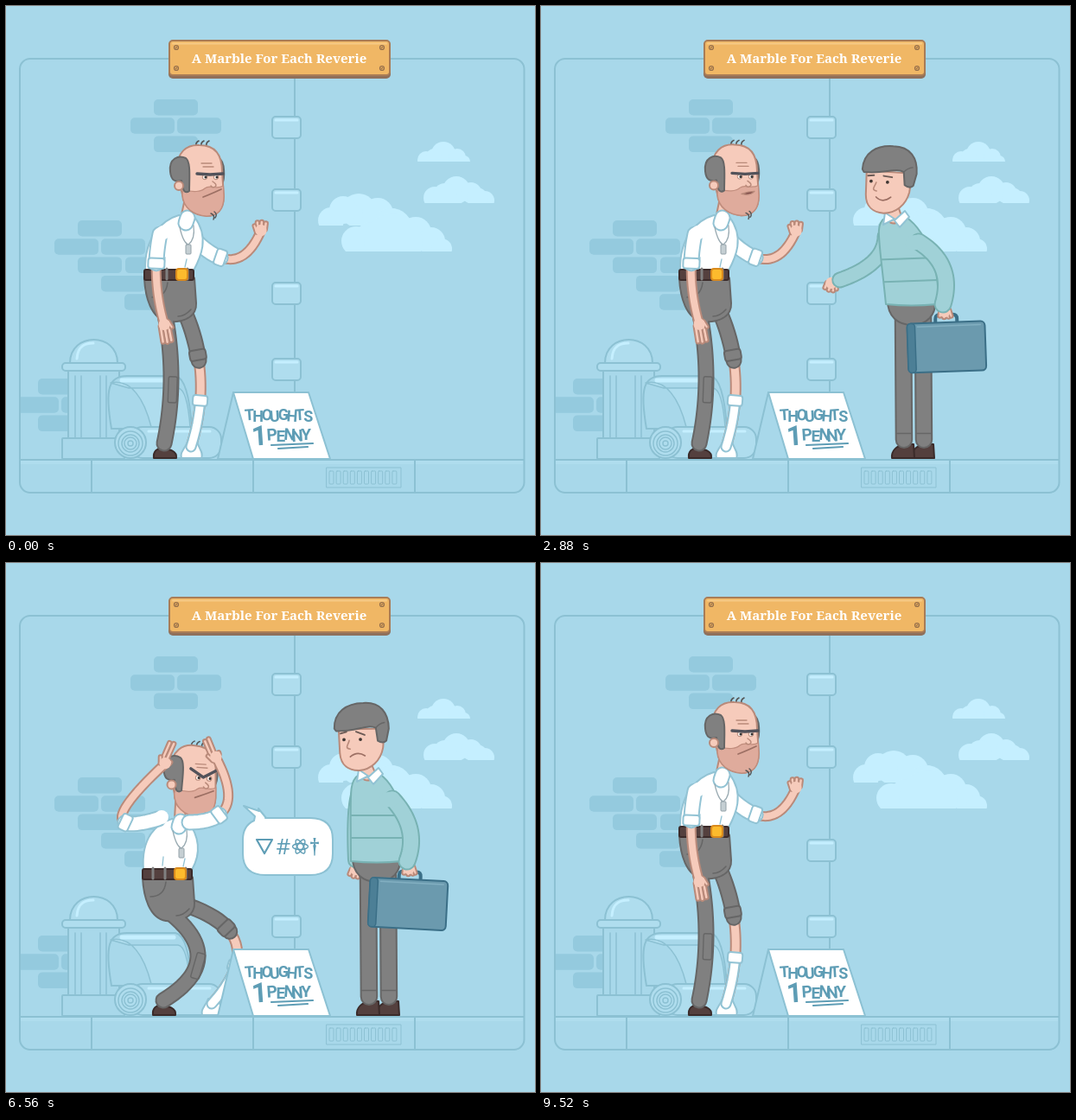
Animation of 612x612 px, one loop 9640 ms. Source, as an HTML page with a canvas:

```html
<!DOCTYPE html>
<html lang="en">
<head>
<meta charset="utf-8">
<title>Street scene</title>
<style>
html, body { margin: 0; width: 100%; height: 100%; overflow: hidden; background: #a8d8ea; }
canvas { display: block; width: 100vw; height: 100vh; }
</style>
</head>
<body>
<canvas id="stage" width="612" height="612"></canvas>
<script>
const canvas = document.getElementById('stage');
const c = canvas.getContext('2d');
const LOOP = 9640, STEP = 40, RAD = Math.PI / 180;
const SKY = '#a8d8ea', EDGE = '#8cc1d3', PALE = '#afddee', BRICK = '#94cade', CLOUD = '#c5efff', INK = '#5e9db5';
const SKIN = ['#f6cbbb', '#b98a7a'], SHIRT = ['#ffffff', '#92c3d4'], PANTS = ['#808080', '#666666'];
const SHOE = ['#54403e', '#3b2b2a'], KNIT = ['#a0d1d7', '#78b2b3'], CASE = ['#6b9aae', '#3b6f87'];

// ---------- drawing helpers ----------
function shape(d, fill, line, w = 2) {
  const p = new Path2D(d);
  if (fill) { c.fillStyle = fill; c.fill(p); }
  if (line) { c.strokeStyle = line; c.lineWidth = w; c.stroke(p); }
}
function box(x, y, w, h, r, fill, line, lw = 2) {
  c.beginPath();
  c.roundRect(x, y, w, h, r);
  if (fill) { c.fillStyle = fill; c.fill(); }
  if (line) { c.strokeStyle = line; c.lineWidth = lw; c.stroke(); }
}
function dot(x, y, r, fill, line, lw = 2) {
  c.beginPath();
  c.arc(x, y, r, 0, 7);
  if (fill) { c.fillStyle = fill; c.fill(); }
  if (line) { c.strokeStyle = line; c.lineWidth = lw; c.stroke(); }
}
function at(x, y, deg, draw) {
  c.save();
  c.translate(x, y);
  c.rotate(deg * RAD);
  draw();
  c.restore();
}
function stroke(pts, w, color) {
  c.beginPath();
  pts.forEach(p => c.lineTo(p[0], p[1]));
  c.lineWidth = w;
  c.strokeStyle = color;
  c.stroke();
}
function limb(pts, w, [fill, line]) {
  stroke(pts, w + 1, line);
  stroke(pts, w - 3, fill);
}
// Samples a quadratic curve that passes through the middle point.
function bend(ax, ay, mx, my, bx, by, n = 24) {
  const qx = 2 * mx - (ax + bx) / 2, qy = 2 * my - (ay + by) / 2;
  return Array.from({ length: n + 1 }, (_, i) => {
    const t = i / n, u = 1 - t;
    return [u * u * ax + 2 * u * t * qx + t * t * bx, u * u * ay + 2 * u * t * qy + t * t * by];
  });
}
const clamp = v => Math.max(0, Math.min(1, v));
const part = (pts, from, to) => pts.slice(Math.round(from * 24), Math.round(to * 24) + 1);
function cuff(pts, i, w, colors) {
  const a = pts[i - 2], b = pts[i];
  at((a[0] + b[0]) / 2, (a[1] + b[1]) / 2, Math.atan2(b[1] - a[1], b[0] - a[0]) / RAD,
    () => box(-6, -w / 2, 12, w, 3, ...colors));
}
// fold counts how many fingers are curled in.
function hand(x, y, dir, len, fold = 0) {
  at(x, y, dir, () => {
    [fold - 2, fold - 1, fold].forEach((f, i) => {
      const reach = 5 + len * (1 - clamp(f)) - Math.abs(i - 1);
      limb([[2, (i - 1) * 4.6], [reach, (i - 1) * 4.9]], 5.5, SKIN);
    });
    limb([[-2, -5], [5, -8]], 5, SKIN);
    box(-6, -6.5, 13, 13, 6, SKIN[0]);
  });
}

// ---------- scenery ----------
function puff(base, circles) {
  c.save();
  c.beginPath();
  c.rect(340, 0, 272, base);
  c.clip();
  circles.forEach(([x, y, r]) => dot(x, y, r, CLOUD));
  c.restore();
}
function bricks(x, y, rows) {
  rows.forEach((row, i) => row.forEach(dx => box(x + dx, y + i * 21.3, 51, 18.5, 5, BRICK)));
}
function scenery() {
  c.fillStyle = SKY;
  c.fillRect(0, 0, 612, 612);
  bricks(144, 108, [[27], [0, 54], [27]]);
  bricks(56, 248, [[27], [0, 54], [27, 82], [54, 109], [81]]);
  c.save();
  c.beginPath();
  c.rect(16, 400, 120, 130);
  c.clip();
  bricks(10, 431, [[27], [0, 54], [27]]);
  c.restore();
  puff(180, [[506, 171, 14], [486, 178, 10], [522, 175, 10], [530, 180, 7], [495, 174, 9]]);
  puff(228, [[521, 213, 16], [496, 222, 13], [538, 216, 12], [554, 225, 11], [508, 219, 14], [545, 222, 12]]);
  puff(254, [[408, 237, 20], [376, 248, 15], [390, 236, 16], [430, 240, 18], [446, 250, 16]]);
  puff(284, [[446, 258, 24], [474, 262, 18], [492, 272, 16], [504, 281, 12], [422, 268, 18], [405, 272, 17], [448, 274, 34]]);
  stroke([[334, 82], [334, 448]], 2, EDGE);
  [128, 212, 320, 408].forEach(y => {
    box(308, y, 33, 25, 4, PALE, EDGE);
    stroke([[312, y + 4], [337, y + 4]], 3, CLOUD);
  });
  // column
  shape('M74 413C74 377 129 377 129 413Z', PALE, EDGE);
  shape('M82 408C83 392 93 390 101 390', null, CLOUD, 3);
  box(72, 422, 59, 79, 0, SKY, EDGE);
  [80, 87, 109, 116].forEach(x => stroke([[x, 428], [x, 500]], 1.5, EDGE));
  box(65, 413, 73, 9, 4, PALE, EDGE);
  box(65, 500, 72, 24, 1, SKY, EDGE);
  // bedroll
  shape('M122 489C114 442 119 428 140 428H196C208 430 213 458 215 489Z', SKY, EDGE);
  shape('M121 436C145 431 160 455 168 487H213C211 460 207 443 199 442H142Z', PALE, EDGE, 1.5);
  stroke([[134, 433], [194, 433]], 5, CLOUD);
  box(144, 487, 105, 36, 14, PALE, EDGE);
  stroke([[165, 492], [236, 492]], 3, CLOUD);
  dot(144, 505, 18, PALE, EDGE);
  [14, 10, 7, 3].forEach(r => dot(144, 506, r, null, EDGE, 1.5));
  // floor and frame
  c.fillStyle = PALE;
  c.fillRect(17, 525, 581, 5);
  stroke([[16, 525], [599, 525]], 2, EDGE);
  [99, 286, 473].forEach(x => stroke([[x, 525], [x, 563]], 2, EDGE));
  box(371, 534, 86, 23, 0, null, EDGE, 1);
  for (let i = 0; i < 10; i++) box(374 + i * 8.1, 538, 5, 15, 1, null, EDGE, 1);
  box(16, 61, 583.5, 502, 12, null, EDGE);
}
function plaque() {
  box(188, 41, 257, 43, 5, '#8f705b');
  box(189, 40, 255, 40, 4, '#f0b765', '#a97c56');
  stroke([[193, 43.5], [440, 43.5]], 2, '#f8cb86');
  [[197, 48], [435, 48], [197, 72], [435, 72]].forEach(([x, y]) => {
    dot(x, y, 2.5, '#dca45a', '#96704c', 1.2);
    stroke([[x - 1, y + 1], [x + 1, y - 1]], 1, '#96704c');
  });
  write('A Marble For Each Reverie', 316, 65.5, 'bold 15px "Noto Serif", serif', '#fff');
}
function write(s, x, y, font, color) {
  c.font = font;
  c.fillStyle = color;
  c.textAlign = 'center';
  c.fillText(s, x, y);
}
function lettering(s, x, y, gap, size) {
  [...s].forEach((ch, i) => at(x + i * gap, y + (i % 2 ? .8 : -.8), i % 3 * 4 - 4,
    () => write(ch, 0, 0, `bold ${size}px Roboto, sans-serif`, INK)));
}
function board() {
  shape('M263 447L245 524H286L282 490Z', SKY, EDGE);
  shape('M263 447H350L375 524H286Z', '#fff', EDGE);
  lettering('THOUGHTS', 282, 480, 9.7, 18);
  lettering('1', 294, 509, 0, 32);
  lettering('PENNY', 308, 503, 9.8, 19);
  shape('M307 508L355 506M315 512L349 510', null, INK, 2.2);
}

// ---------- poses ----------
// look: anger, far arm in front, curled fingers
const stand = {
  head: [224, 200, 0], neck: [209, 242], belt: [189, 311, 0],
  near: [178, 264, 174, 315, 183, 368, 80, 16], far: [216, 268, 262, 293, 295, 260, -85, 5],
  nLeg: [183, 352, 191, 430, 183, 506, 0], fLeg: [206, 352, 225, 430, 214, 510, .66], look: [0, 0, 0]
};
const rant = {
  head: [177, 210, -44], neck: [192, 254], belt: [182, 326, -3],
  near: [178, 274, 222, 238, 245, 198, -65, 20], far: [205, 270, 253, 245, 254, 198, -115, 6],
  nLeg: [178, 366, 210, 440, 182, 506, 0], fLeg: [201, 362, 241, 426, 214, 510, .64], look: [0, 0, 2]
};
const fling = {
  ...rant, head: [176, 222, -20], neck: [184, 264], belt: [183, 334, 0],
  near: [165, 280, 120, 290, 82, 258, -150, 12], far: [205, 280, 245, 262, 262, 222, -60, 14],
  nLeg: [180, 374, 214, 442, 182, 506, 0], look: [1, 0, 0]
};
const raise = {
  ...rant, head: [200, 225, -8], neck: [194, 270], belt: [184, 338, 0],
  near: [170, 280, 142, 232, 176, 176, -75, 18], far: [212, 280, 252, 230, 240, 174, -100, 18],
  nLeg: [180, 378, 216, 444, 182, 506, 0], look: [1, 1, 1]
};
const horns = {
  head: [216, 250, 4], neck: [201, 296], belt: [187, 360, 0],
  near: [176, 296, 134, 293, 184, 232, -66, 20], far: [212, 300, 255, 281, 243, 225, -112, 18],
  nLeg: [186, 402, 222, 456, 182, 506, 0], fLeg: [203, 394, 266, 440, 238, 510, .72], look: [1, 1, 1]
};
const kneel = {
  head: [222, 291, -33], neck: [218, 337], belt: [193, 398, 14],
  near: [206, 354, 258, 387, 312, 376, -12, 4], far: [232, 341, 281, 326, 302, 268, -75, 4],
  nLeg: [184, 436, 206, 501, 146, 514, 110], fLeg: [204, 430, 227, 480, 224, 514, 1], look: [-.5, 0, 0]
};
const slump = {
  head: [256, 350, 12], neck: [234, 386], belt: [187, 426, 36],
  near: [220, 404, 238, 452, 270, 498, 30, 12], far: [238, 394, 266, 446, 292, 488, 40, 10],
  nLeg: [178, 462, 192, 510, 112, 513, 110], fLeg: [200, 458, 220, 494, 210, 516, 1], look: [0, 0, 0]
};
const hop = { ...stand, head: [220, 192, -4], neck: [206, 236], belt: [186, 306, -2], near: [174, 260, 164, 310, 166, 362, 95, 16] };
const beggar = [
  [0, stand], [3200, stand], [3620, rant], [4640, rant], [4980, fling], [5180, fling], [5560, raise],
  [5960, horns], [6960, horns], [7320, kneel], [7960, kneel], [8360, slump], [8820, slump], [9240, hop], [9480, stand], [LOOP, stand]
];

const wait = {
  hip: [429, 345], neck: [418, 243], head: [418, 200, 0],
  near: [471, 308, 468, 345, 0], far: [404, 300, 405, 354], foot: [430], mouth: [.4, 0]
};
const give = {
  ...wait, neck: [408, 243], head: [403, 202, 4],
  near: [465, 304, 465, 345, -2], far: [382, 298, 336, 320], mouth: [1, 0]
};
const recoil = {
  ...wait, hip: [456, 343], neck: [456, 238], head: [456, 190, 10],
  near: [505, 290, 522, 330, -28], far: [420, 292, 404, 312], mouth: [-.4, 1]
};
const doubt = {
  ...wait, hip: [455, 342], neck: [445, 240], head: [440, 196, 0],
  near: [494, 303, 495, 340, 0], far: [444, 295, 446, 330], mouth: [-.2, .25]
};
const frown = { ...wait, head: [412, 202, -1], near: [467, 308, 464, 345, 3], mouth: [-1, 0] };
const leave = {
  ...wait, neck: [438, 243], head: [444, 200, 0],
  near: [469, 310, 461, 350, 14], far: [416, 308, 393, 350], foot: [451], mouth: [0, .9]
};
const passer = [
  [0, wait], [1960, wait], [2560, give], [3280, give], [3600, recoil], [4040, doubt], [5080, doubt],
  [5720, frown], [7060, frown], [7440, leave], [LOOP, leave]
];
function poseAt(keys, t) {
  const i = Math.max(1, keys.findIndex(k => k[0] > t));
  const [t0, a] = keys[i - 1], [t1, b] = keys[i];
  const k = (t - t0) / (t1 - t0), e = k * k * (3 - 2 * k), out = {};
  for (const name in a) out[name] = a[name].map((v, j) => v + (b[name][j] - v) * e);
  return out;
}

// ---------- beggar ----------
function beggarHead(angry, talk) {
  [-6, 0, 6].forEach(x => shape(`M${x + 2} -38Q${x + 1} -42 ${x + 5} -44`, null, '#555', 1.6));
  shape('M22 -24C30 -20 29 0 26 6L22 4Z', ...PANTS);
  shape('M-27 -8C-27 -32 -14 -40 0 -39C18 -39 26 -28 26 -8L28 20C28 36 20 43 8 43C-6 42 -19 34 -20 18Z', ...SKIN);
  shape('M-19 12C-8 16 2 15 6 11C12 6 19 13 27.5 8L28 20C28 36 20 43 8 43C-6 42 -19 34 -20 18Z', '#dfab9c', '#c18d7d', 1.2);
  shape('M-34 -8C-36 -24 -24 -28 -16 -24C-10 -20 -12 0 -12 14C-17 18 -20 13 -21 2C-28 4 -33 2 -34 -8Z', ...PANTS);
  dot(-24, 8, 5, ...SKIN);
  shape('M2 -18H14M4 -14H16', null, SKIN[1], 1.3);
  [[6, -2], [19, -2]].forEach(([x, y]) => {
    dot(x, y, 2.8, '#fdf2ec', SKIN[1], 1);
    dot(x + 1, y, 1.5, '#333');
  });
  const a = Math.max(0, angry) * 6;
  shape(`M-3 ${-6 - a}L12 ${-5 + a / 3}L27 ${-6 - a}`, null, '#52525a', 3.4);
  shape('M15 3Q21 7 18 9Q15 11 13 8', SKIN[0], SKIN[1], 1.5);
  if (talk > .1) shape(`M8 18Q16 ${16 - talk * 3} 23 15Q18 ${19 + talk * 4} 8 18Z`, '#7d4a48', SKIN[1], 1.3);
  else shape('M4 21Q12 18 25 12', null, '#9c6f63', 1.7);
  shape('M13 40Q18 42 16 47M17 38Q21 41 18 45', null, '#555', 1.4);
}
function arm([sx, sy, mx, my, hx, hy, dir, len], fold) {
  const pts = bend(sx, sy, mx, my, hx, hy);
  limb(part(pts, .3, 1), 11, SKIN);
  hand(hx, hy, dir, len, fold);
  limb(part(pts, 0, .34), 18, SHIRT);
  cuff(pts, 9, 19, SHIRT);
}
function drawBeggar(t) {
  const p = poseAt(beggar, t);
  const sway = Math.sin(t / 260) * (t < 3200 ? .6 : t < 8900 ? 1 : 0);
  p.head[1] += sway;
  p.near[5] += sway * .5;
  p.far[5] -= sway;
  const [nx, ny] = p.neck, [bx, by, rot] = p.belt, [hx, hy, tilt] = p.head, [anger, front, fold] = p.look;
  const cos = Math.cos(rot * RAD), sin = Math.sin(rot * RAD);
  const world = (x, y) => [bx + x * cos - y * sin, by + x * sin + y * cos];
  const onTop = front > .5;
  if (!onTop) arm(p.far, fold);

  // bare leg with sock
  const fl = bend(...p.fLeg.slice(0, 6)), sock = p.fLeg[6];
  limb(part(fl, .35, 1), 12, SKIN);
  if (sock < .95) {
    const [fx, fy] = p.fLeg.slice(4);
    at(fx, fy, 0, () => shape('M-4 -6C-8 4 -13 6 -11 13H12C15 7 9 2 7 -6Z', ...SHIRT));
    limb(part(fl, sock, 1), 12, SHIRT);
    cuff(fl, Math.round(sock * 24) + 1, 17, SHIRT);
  }
  // trousers share one outline
  const [nfx, nfy, turn] = p.nLeg.slice(4);
  at(nfx, nfy, turn, () => shape('M-12 17C-13 9 -8 5 -2 6C6 7 15 8 14 17Z', ...SHOE));
  const nl = bend(...p.nLeg.slice(0, 6)), thigh = part(fl, 0, .36);
  const seat = 'M-28 4C-27 26 -20 50 -2 53C15 55 31 48 30 33L28 4Z';
  stroke(thigh, 19, PANTS[1]);
  stroke(thigh, 15, PANTS[0]);
  cuff(fl, 9, 19, PANTS);
  stroke(nl, 19, PANTS[1]);
  at(bx, by, rot, () => shape(seat, null, PANTS[1], 4));
  stroke(nl, 15, PANTS[0]);
  at(bx, by, rot, () => {
    shape(seat, PANTS[0]);
    shape('M-20 26Q-4 26 -2 9M25 40Q18 48 10 48', null, PANTS[1], 1.6);
  });
  const [kx, ky] = nl[14];
  at(kx, ky, Math.atan2(nl[15][1] - nl[13][1], nl[15][0] - nl[13][0]) / RAD - 90,
    () => box(-3, -14, 10, 30, 2, null, PANTS[1], 1.4));

  // shirt
  const [lx, ly] = world(-28, -5), [rx, ry] = world(28, -5), ux = nx - bx, uy = ny - by;
  shape(`M${nx - 9} ${ny}C${nx - 26} ${ny + 5} ${lx + ux * .35 - 8} ${ly + uy * .6} ${lx} ${ly}
    L${rx} ${ry}C${rx + 8} ${ry + uy * .22} ${nx + 27} ${ny + 26} ${nx + 9} ${ny + 2}Z`, ...SHIRT);
  at(bx, by, rot, () => {
    box(-29, -6, 57, 12, 2, ...SHOE);
    [-17, -3, 21].forEach(x => stroke([[x, -7], [x, 5]], 3, PANTS[0]));
    box(8, -7, 13, 13, 3, '#fdbb2d', '#d98a1d');
    shape('M-6 -10L-5 -20M18 -9L20 -18', null, SHIRT[1], 1.3);
  });
  const jx = hx - 12 * Math.cos(tilt * RAD) - 28 * Math.sin(tilt * RAD);
  const jy = hy - 12 * Math.sin(tilt * RAD) + 28 * Math.cos(tilt * RAD);
  limb([[nx, ny], [jx, jy]], 13, SKIN);
  limb([[nx - 1, ny + 9], [nx + 1, ny + 3]], 18, SHIRT);
  shape(`M${nx - 8} ${ny + 14}Q${nx - 4} ${ny + 32} ${nx + 2} ${ny + 34}Q${nx + 10} ${ny + 28} ${nx + 8} ${ny + 12}`, null, '#9aabb2', 1.3);
  box(nx - 1, ny + 34, 6, 11, 1, '#c5cfd3', '#93a1a8', 1);
  const speaking = t > 2240 && t < 3200 || t > 3560 && t < 5000 || t > 5900 && t < 6480 || t > 7200 && t < 8000;
  at(hx, hy, tilt, () => beggarHead(anger, speaking ? .5 + .5 * Math.sin(t / 70) : 0));
  if (onTop) arm(p.far, fold);
  arm(p.near, fold);
  dot(p.near[0] + 4, p.near[1] - 2, 8, SHIRT[0]);
}

// ---------- passer-by ----------
// Walks in from the right, later backs out the same way.
function shiftAt(t) {
  if (t < 1040) return 242 * (1 - t / 1040) ** 1.15;
  return t > 7100 ? 51 * ((t - 7100) / 380) ** 1.2 : 0;
}
function passerHead([curve, open]) {
  shape('M-27 -10L-26 18C-25 32 -16 38 -4 38C10 37 21 27 24 12L26 -10Z', ...SKIN);
  shape('M-32 -11C-32 -30 -18 -40 2 -40C22 -41 31 -28 31 -10L28 4Q24 8 18 4L16 -11C6 -16 -6 -7 -30 -8Z', ...PANTS);
  shape('M16 -11Q20 -16 26 -17', null, PANTS[1], 1.4);
  const b = curve < 0 ? 2 : 0;
  shape(`M-25 ${-4 - b / 2}L-18 ${-5 - b}M-7 ${-5 - b}L3 ${-4 + b / 2}`, null, '#6b5a55', 1.8);
  dot(-21, 2, 1.9, '#3f3734');
  dot(-2, 2, 1.9, '#3f3734');
  shape('M-15 3C-16 8 -21 12 -14 13', null, SKIN[1], 1.6);
  if (open > .2) {
    c.beginPath();
    c.ellipse(-10, 22, 5 - open * 1.5, 1 + open * 3.5, 0, 0, 7);
    c.fillStyle = '#7d4a48';
    c.fill();
    c.strokeStyle = SKIN[1];
    c.stroke();
  } else shape(`M-14 ${21 - curve}Q-6 ${21 + curve * 6} 3 ${20 - curve}`, null, '#9c6f63', 1.7);
}
function drawPasser(t) {
  const shift = shiftAt(t);
  if (shift > 236) return;
  const p = poseAt(passer, t), [px, py] = p.hip, [nx, ny] = p.neck;
  const walk = Math.min(1, shift / 40), theta = shift / 17.5 - 1.95;
  c.save();
  c.beginPath();
  c.rect(16, 62, 582, 500);
  c.clip();
  c.translate(shift, 0);

  const [fmx, fmy, fhx, fhy] = p.far, fa = bend(nx - 10, ny + 24, fmx, fmy, fhx, fhy);
  hand(fhx, fhy, 110, 4);
  limb(part(fa, 0, .9), 18, KNIT);

  const seat = `M${px - 28} ${py - 4}C${px - 28} ${py + 14} ${px - 16} ${py + 24} ${px} ${py + 24}C${px + 18} ${py + 24} ${px + 28} ${py + 12} ${px + 27} ${py - 4}Z`;
  [1, 0].forEach(side => {
    const a = theta + side * Math.PI, up = walk * 26 * Math.max(0, Math.cos(a)), gap = side ? 13 : -10;
    const ax = p.foot[0] + gap * (1 - walk * .6) + walk * 18 * Math.sin(a), ay = 508 - up;
    const sx = px + gap, sy = py + 14;
    const pts = bend(sx, sy, (sx + ax) / 2 - up * 2.6, (sy + ay) / 2 + up * 1.2, ax, ay);
    at(ax, ay, -up * 2.8, () => shape('M-14 15C-15 6 -8 1 0 -1L11 -1L12 15Z', ...SHOE));
    limb(part(pts, 0, .97), 19.5, PANTS);
    const [qx, qy] = pts[22];
    at(qx, qy, -up * 2.4, () => stroke([[-8, -1], [8, -1]], 1.5, PANTS[1]));
  });
  shape(seat, ...PANTS);

  // sweater
  const d = nx - px + 11, torso = `M${nx - 10} ${ny + 2}C${nx - 22} ${ny + 10} ${px - 30 + d * .8} ${py - 80} ${px - 30} ${py}
    Q${px} ${py + 3} ${px + 29} ${py}C${px + 34} ${py - 30} ${nx + 42} ${ny + 20} ${nx + 14} ${ny + 1}Z`;
  shape(torso, KNIT[0]);
  c.save();
  c.clip(new Path2D(torso));
  const slope = d * .25;
  [53, 27].forEach(h => stroke([[px - 70, py - h - slope], [px + 70, py - h + slope]], 2, KNIT[1]));
  c.restore();
  shape(torso, null, KNIT[1]);

  const [hx, hy, tilt] = p.head;
  limb([[nx, ny], [hx + 2, hy + 32]], 18, SKIN);
  shape(`M${nx - 10} ${ny - 4}L${nx - 12} ${ny + 10}L${nx} ${ny + 4}L${nx + 7} ${ny + 13}L${nx + 18} ${ny + 1}L${nx + 13} ${ny - 6}L${nx + 2} ${ny + 4}Z`, ...SHIRT);
  at(hx, hy, tilt, () => passerHead(p.mouth));

  // arm and case
  const [mx, my, ex, ey, swing] = p.near;
  at(ex + 3, ey + 12, swing + Math.sin(theta) * walk * 3, () => {
    shape('M-12 10V5Q-12 0 -7 0H8Q13 0 13 5V10', null, CASE[1], 4);
    box(-45, 9, 90, 57, 5, ...CASE);
    box(-45, 9, 9, 57, 4, '#4c7f96', CASE[1], 1.5);
    stroke([[-33, 13], [40, 13]], 1.5, '#82afc1');
  });
  hand(ex + 2, ey + 8, 95, 2);
  const sx = nx + 29, sy = ny + 30;
  limb(bend(sx, sy, mx, my, ex, ey), 20, KNIT);
  stroke([[sx - 7, sy + 1], [sx, sy]], 17, KNIT[0]);
  c.restore();
}

// ---------- speech ----------
function bubble(t, from, to, tx, ty, draw) {
  const s = Math.min(1, (t - from) / 160, (to - t) / 120);
  if (s <= 0) return;
  c.save();
  c.translate(tx, ty);
  c.scale(s, s);
  c.translate(-tx, -ty);
  draw();
  c.restore();
}
function star(x, y, n, r1, r2) {
  let d = 'M';
  for (let i = 0; i < n * 2; i++) {
    const r = i % 2 ? r2 : r1, a = i * Math.PI / n;
    d += `${x + r * Math.sin(a)} ${y - r * Math.cos(a)} `;
  }
  shape(d + 'Z', null, INK, 1.6);
}
function firstWords() {
  shape('M232 99H282Q309 99 309 124V140Q309 165 282 165H232L222 175L221 171L207 178L217 167L216 163Q205 156 205 140V124Q205 99 232 99Z', '#fff', EDGE);
  dot(226, 132, 8.5, null, INK, 1.8);
  shape('M221 128L225 131M231 128L227 131M222 137Q226 132 230 137', null, INK, 1.8);
  shape('M243 124C254 128 254 139 239 138C250 146 259 135 253 127Q249 122 243 124Z', null, INK, 1.6);
  shape('M267 121C270 127 276 131 275 137C273 144 261 144 259 137C257 133 261 130 261 127L264 130Z', INK);
  shape('M268 131Q273 138 267 140Q262 138 268 131Z', '#fff');
  star(288, 132, 9, 10, 5);
}
function secondWords() {
  shape('M300 295H352Q378 295 378 320V336Q378 361 352 361H300Q274 361 274 336V320Q274 304 287 298L288 293L275 281L293 287L292 284L301 295Z', '#fff', EDGE);
  shape('M290 320H308L299 336Z', null, INK, 2.2);
  write('#', 321, 337, '26px "Open Sans", sans-serif', INK);
  [0, 60, 120].forEach(r => at(340.5, 328, r, () => {
    c.beginPath();
    c.ellipse(0, 0, 9, 3.5, 0, 0, 7);
    c.strokeStyle = INK;
    c.lineWidth = 1.4;
    c.stroke();
  }));
  write('†', 357, 336, 'bold 24px "Noto Serif", serif', INK);
}

function draw(now) {
  const t = Math.floor(now % LOOP / STEP) * STEP;
  c.lineJoin = c.lineCap = 'round';
  scenery();
  drawPasser(t);
  drawBeggar(t);
  board();
  bubble(t, 3560, 4920, 207, 178, firstWords);
  bubble(t, 5920, 7000, 275, 281, secondWords);
  plaque();
}
const start = performance.now();
function tick() {
  draw(performance.now() - start);
  requestAnimationFrame(tick);
}
tick();
</script>
</body>
</html>
```
